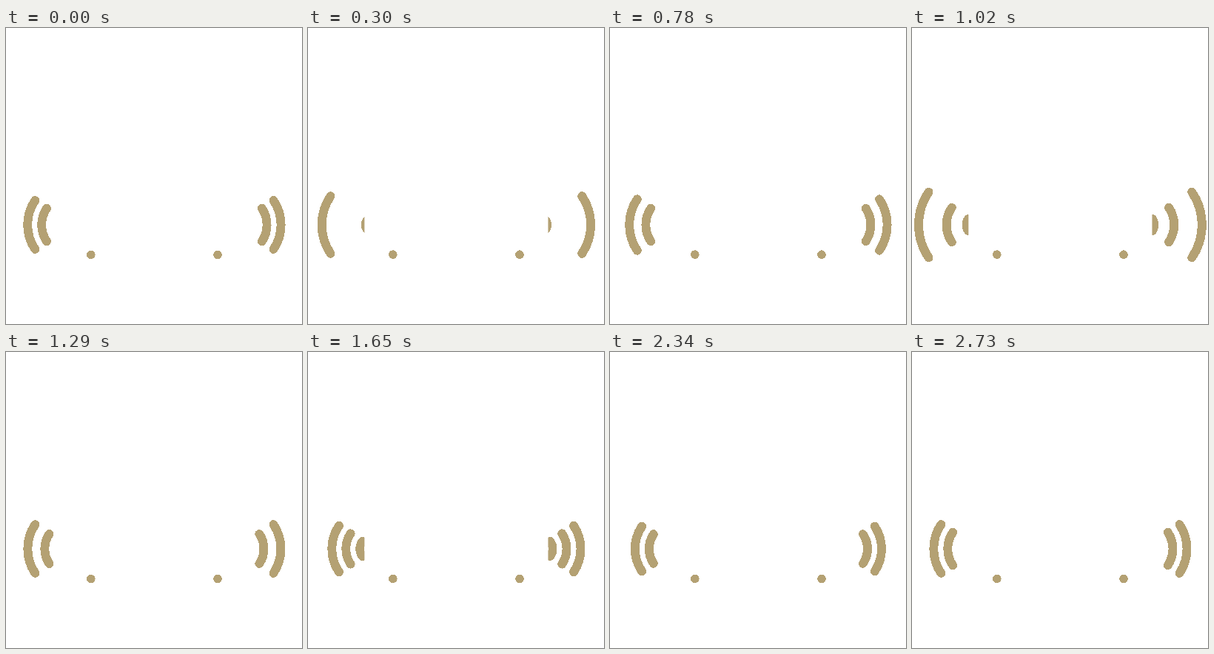
An HTML page for the animation above (2.76 s loop, 400x400 px).

```html
<!DOCTYPE html>
<html lang="en">
<head>
<meta charset="utf-8">
<title>Sound waves</title>
<style>
  html, body { margin: 0; width: 100%; height: 100%; overflow: hidden; background: #fff; }
  svg { display: block; width: 100%; height: 100%; }
</style>
</head>
<body>
<svg viewBox="0 0 400 400" shape-rendering="crispEdges">
  <defs>
    <clipPath id="side"><rect width="76.35" height="400"/></clipPath>
    <g id="half">
      <g clip-path="url(#side)">
        <path id="waves" fill="none" stroke="#b4a173" stroke-width="11.9" stroke-linecap="round"/>
      </g>
      <circle id="dot" cx="114.8" cy="306.4" r="5.8" fill="#b4a173"/>
    </g>
  </defs>
  <use href="#half"/>
  <use href="#half" transform="matrix(-1 0 0 1 400.8 0)"/>
</svg>
<script>
const LOOP = 2760, STEP = 30;
const RING_END = 1650, REST = 2730;
const CX = 88.2, CY = 266, SPREAD = 34 * Math.PI / 180;
const DOT_Y = 306.4;
const SPEED = 0.164, RAMP = 240;

// Distance behind the front at which each wave leaves the centre
const starts = [-59, -40, 19, 46.2, 68.4, 106, 133, 156, 195, 214, 233];
const waves = document.getElementById('waves');
const dot = document.getElementById('dot');

// Speed up, run evenly, then glide to rest
function travel(t) {
  if (t < RAMP) return SPEED * t * t / (2 * RAMP);
  if (t <= RING_END) return SPEED * (t - RAMP / 2);
  const left = Math.max(0, (REST - t) / (REST - RING_END));
  return travel(RING_END) + 22 * (1 - left ** 1.55);
}

function arc(r) {
  const x = CX - r * Math.cos(SPREAD), dy = r * Math.sin(SPREAD);
  return `M${x} ${CY - dy}A${r} ${r} 0 0 0 ${x} ${CY + dy}`;
}

function draw(t) {
  const front = travel(t);
  const limit = t > RING_END ? 63 : 85;
  waves.setAttribute('d', starts
    .map(s => front - s)
    .filter(r => r > 6 && r < limit)
    .map(arc).join(''));

  const ringing = t > 0 && t < RING_END;
  const shake = ringing ? 0.5 * Math.cos(2 * Math.PI * t / 180) : 0;
  dot.setAttribute('cy', DOT_Y + shake);
}

const begin = performance.now();
function tick() {
  const t = (performance.now() - begin) % LOOP;
  draw(Math.floor(t / STEP) * STEP);
  requestAnimationFrame(tick);
}
draw(0);
requestAnimationFrame(tick);
</script>
</body>
</html>
```
